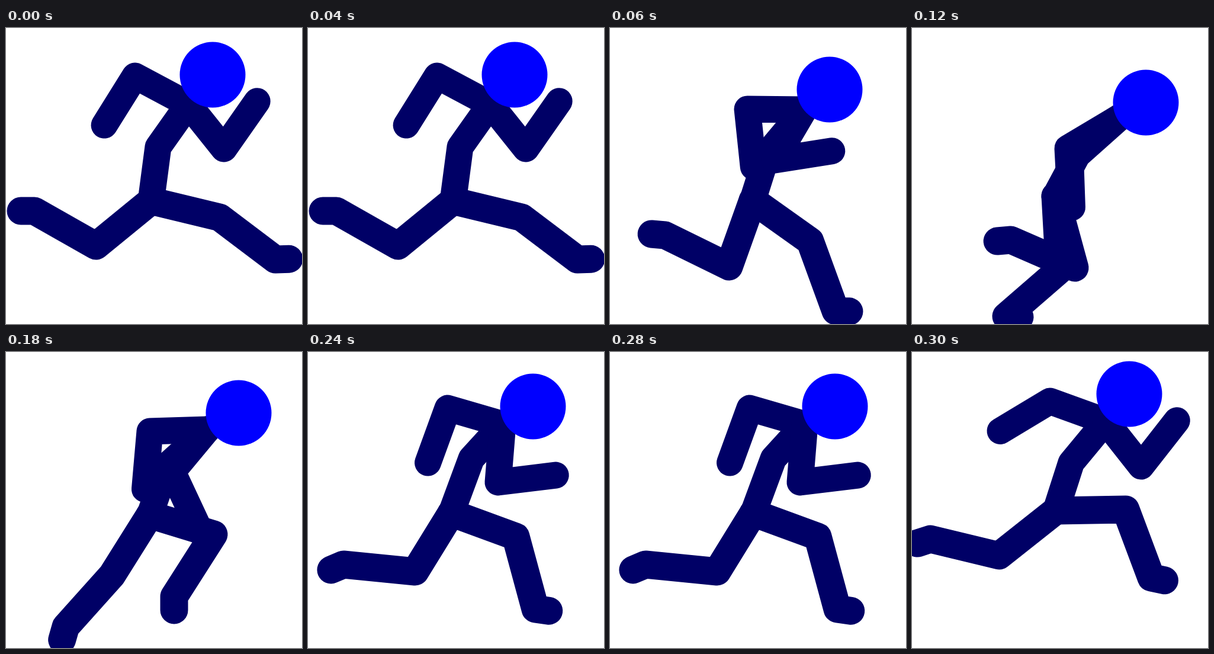
An HTML page with a canvas for the animation above (360 ms loop, 500 px wide and 500 px high).

```html
<!DOCTYPE html>
<html lang="en">
<head>
<meta charset="utf-8">
<title>Runner</title>
<style>
  html, body { margin: 0; width: 100%; height: 100%; overflow: hidden; background: #fff; }
  canvas { display: block; width: 500px; height: 500px; }
</style>
</head>
<body>
<canvas id="stage" width="500" height="500"></canvas>
<script>
const ctx = document.getElementById('stage').getContext('2d');
const STEP = 60, FOREARM = 98, FOOT = 23, HEAD = 55.5;
const BODY = '#000066', FACE = '#0000ff';

// spine: shoulder, waist, hip; arm: elbow, forearm angle; leg: knee, ankle, foot angle
const poses = [
  { head: [349, 79], spine: [[308, 129], [257, 201], [245, 292]],
    arms: [[218, 81, 122], [368, 204, -55]],
    legs: [[152, 368, 48, 309, 180], [361, 320, 455, 391, -2]] },
  { head: [371, 104], spine: [[328, 138], [266, 212], [241, 291]],
    arms: [[232, 137, 84], [278, 223, -9]],
    legs: [[201, 403, 93, 350, 185], [338, 360, 381, 478, 2]] },
  { head: [395, 126], spine: [[352, 150], [279, 215], [242, 284]],
    arms: [[263, 203, 87], [267, 205, 88]],
    legs: [[275, 405, 167, 358, 175], [249, 409, 159, 487, 3]] },
  { head: [393, 103], spine: [[340, 131], [272, 192], [243, 275]],
    arms: [[243, 134, 95], [281, 202, 65]],
    legs: [[179, 377, 101, 464, 106], [351, 308, 284, 413, 90]] },
  { head: [380, 92], spine: [[329, 122], [276, 180], [242, 272]],
    arms: [[236, 95, 110], [321, 220, -7]],
    legs: [[181, 371, 60, 359, 157], [351, 312, 384, 434, 8]] },
  { head: [367, 71], spine: [[327, 117], [269, 187], [243, 268]],
    arms: [[233, 83, 149], [387, 193, -52]],
    legs: [[147, 344, 31, 316, 162], [361, 266, 404, 381, 12]] }
];

function reach(x, y, deg, len) {
  const a = deg * Math.PI / 180;
  return [x + len * Math.cos(a), y + len * Math.sin(a)];
}

function limb(points, width) {
  ctx.lineWidth = width;
  ctx.beginPath();
  points.forEach(p => ctx.lineTo(...p));
  ctx.stroke();
}

function draw({ head, spine, arms, legs }) {
  const [shoulder, , hip] = spine;
  ctx.fillStyle = '#fff';
  ctx.fillRect(0, 0, 500, 500);
  ctx.strokeStyle = BODY;
  ctx.lineCap = ctx.lineJoin = 'round';
  limb(spine, 45);
  for (const [x, y, a] of arms) {
    limb([shoulder, [x, y], reach(x, y, a, FOREARM)], 45);
  }
  for (const [kx, ky, x, y, a] of legs) {
    limb([hip, [kx, ky], [x, y], reach(x, y, a, FOOT)], 47);
  }
  ctx.fillStyle = FACE;
  ctx.beginPath();
  ctx.arc(...head, HEAD, 0, 2 * Math.PI);
  ctx.fill();
}

const start = performance.now();
function tick() {
  const t = performance.now() - start;
  draw(poses[Math.floor(t / STEP) % poses.length]);
  requestAnimationFrame(tick);
}
tick();
</script>
</body>
</html>
```
